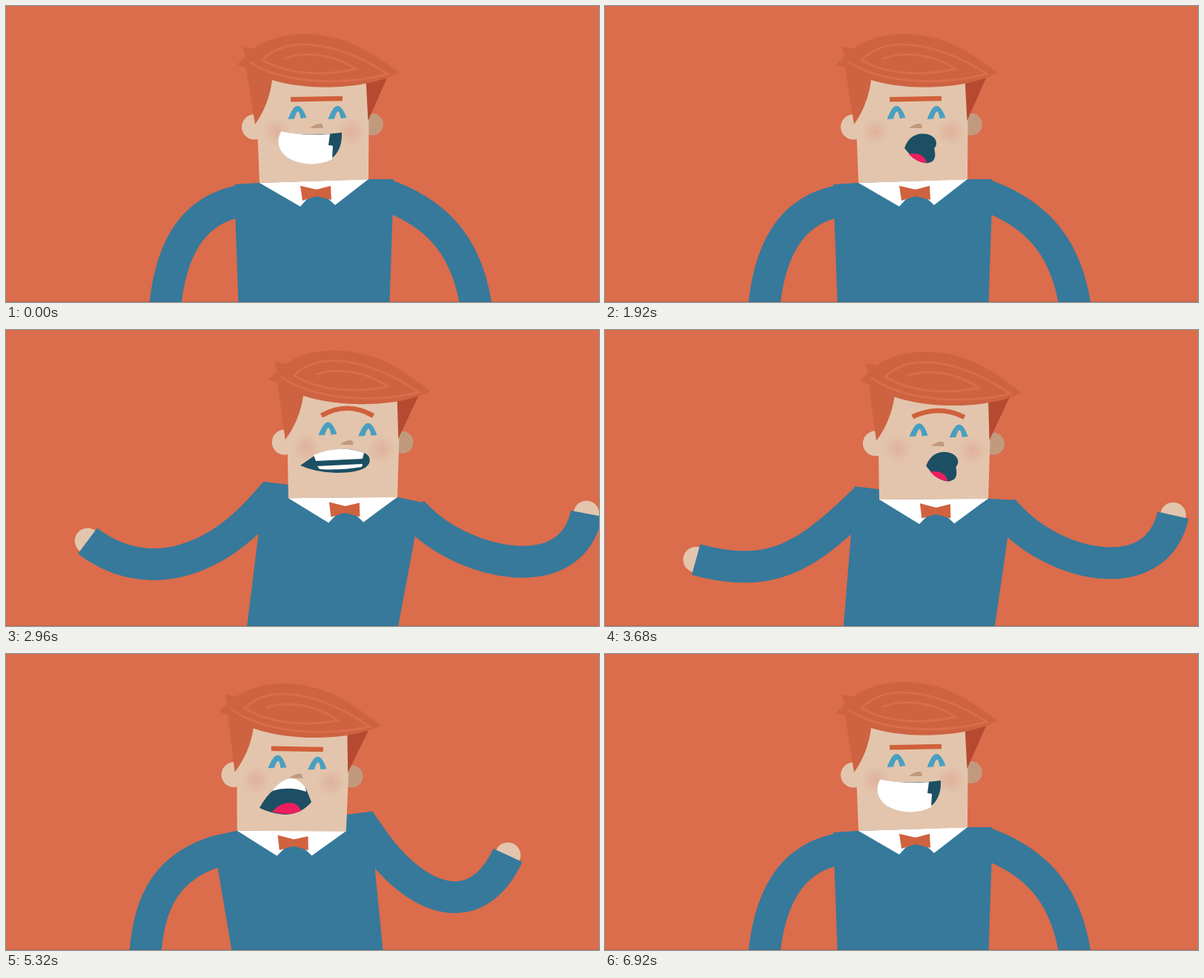
Animation, 800 px wide and 400 px high, one loop 7.04 s. Source, as an HTML page:

```html
<!DOCTYPE html>
<html lang="en">
<head>
<meta charset="utf-8">
<title>Talking man</title>
<style>
html, body { margin: 0; width: 100%; height: 100%; overflow: hidden; background: #db6c4c; }
svg { display: block; width: 100vw; height: 100vh; }
.hair { fill: #ce6341; }
.skin { fill: #e3c5ad; }
.shade { fill: #c19a7e; }
.blue { fill: #36799b; }
.arm { fill: none; stroke: #36799b; stroke-width: 43; }
.dark { fill: #1c4f63; }
.white { fill: #fff; }
.tongue { fill: #ec1e5f; }
.mouth { display: none; }
</style>
</head>
<body>
<svg viewBox="0 0 800 400">
  <defs>
    <radialGradient id="blush">
      <stop offset="0" stop-color="#dc9e8c" stop-opacity=".5"/>
      <stop offset="1" stop-color="#dc9e8c" stop-opacity="0"/>
    </radialGradient>
  </defs>

  <circle id="handL" class="skin" r="17.3"/>
  <circle id="handR" class="skin" r="17.3"/>
  <path id="armL" class="arm"/>
  <path id="armR" class="arm"/>
  <path id="torso" class="blue"/>

  <g id="head">
    <circle class="skin" cx="335" cy="163.5" r="17"/>
    <circle class="shade" cx="494" cy="160" r="15"/>
    <path class="white" d="M342 239L489 234L444 269L434 260Q419 253 406 261L397 271Z"/>
    <path fill="#d0623f" d="M397 243L419 248L438 243L439 262L419 257L400 263Z"/>
    <path class="skin" d="M336 90H485.5L489.5 158L489 234.5L342 239Z"/>
    <path fill="#b54a31" d="M485.5 98L515 95L488.5 155Z"/>
    <path class="hair" d="M319 55L334 58C365 34 430 28 485 60Q508 73 530 90C490 112 410 116 359 100Q355 133 336 160L324 84L312 79L323 68Z"/>
    <path fill="none" stroke="#db6c4c" stroke-width="3" d="M328 75C370 104 450 109 515 92C465 58 385 32 346 73C380 93 430 95 472 85C445 66 405 60 375 71"/>

    <circle cx="365" cy="170" r="20" fill="url(#blush)"/>
    <circle cx="466" cy="170" r="20" fill="url(#blush)"/>
    <path id="brow" fill="none" stroke="#d0603c" stroke-width="6.5"/>
    <g id="eyes" fill="#489fc0">
      <path id="eye" d="M380.5 153Q393 118 405.5 151L397.5 152Q394.5 133 389 152.5Z"/>
      <use href="#eye" x="54"/>
    </g>
    <path class="shade" d="M410 165Q418 158 426 159Q428 162 428 165Z"/>

    <!-- G grin, T teeth, O small round, S shout, A open, W wide -->
    <g id="G" class="mouth">
      <path class="dark" d="M371 170Q410 177 453 171C454 200 438 213 412 213C378 213 360 192 371 170Z"/>
      <path class="white" d="M371 169.5Q404 176 437 173L435 188L441 189L440 207Q428 213.5 412 213.5C378 213.5 359 192 371 169.5Z"/>
    </g>
    <g id="T" class="mouth">
      <path class="dark" d="M361 197Q375 188 385 185Q425 168 450 179L458 188Q415 200 361 197Z"/>
      <path class="white" d="M383 186Q425 166 448 179L449 184Q418 185 386 190Z"/>
      <path class="white" d="M389 191L444 187V191Q418 195 392 195Z"/>
    </g>
    <g id="O" class="mouth" transform="translate(-8 2.5) rotate(-.3 423.5 234)">
      <path class="dark" d="M434 186Q442 172 454 172C466 173 467 183 463 187C466 199 457 202 449 199Q440 195 434 186Z"/>
    </g>
    <g id="S" class="mouth" transform="translate(-39 10) rotate(-1.3 454.5 226.5)">
      <path class="dark" d="M397 183L416 170Q450 154 483 166Q493 170 490 180Q484 193 445 193Q416 192 397 183Z"/>
      <path class="white" d="M415 169Q450 154 483 166L481 174L418 177Z"/>
      <path class="white" d="M420 184L481 181L480 185Q450 190 423 188Z"/>
    </g>
    <g id="A" class="mouth" transform="translate(24.7 -.5) rotate(-2.1 390.8 237)">
      <path class="dark" d="M381 192Q388 174 405 173.5C424 174 428 188 421 194C424 208 420 213 409 213.5Q394 211 381 192Z"/>
      <path class="tongue" d="M386 200Q407 198 410 213.5Q396 212 386 200Z"/>
    </g>
    <g id="W" class="mouth" transform="translate(30.2 -2.5) rotate(-2.1 385.3 239)">
      <path class="dark" d="M342 208Q352 190 362 183Q385 158 404 180L412 200Q398 217 375 217Q356 215 342 208Z"/>
      <path class="white" d="M359 185Q384 154 404 180L405 186Q382 178 359 185Z"/>
      <path class="tongue" d="M359 213Q371 200 384 201Q395 202 398 212Q380 220 359 213Z"/>
    </g>
  </g>
  <rect y="399" width="800" height="1" opacity=".1"/>
</svg>

<script>
const LOOP = 7040, STEP = 40, SYLLABLE = 80;
const NECK_X = 415.5, NECK_Y = 236.5;
const $ = id => document.getElementById(id);
const mix = (a, b, k) => a.map((v, i) => v + (b[i] - v) * k);

// Pose: neck x, y, tilt, brow lift, then for the left and the right arm:
// shoulder height, shoulder angle, wrist angle, hand x, y.
const stand = [NECK_X, NECK_Y, 0, 0, 4.5, 14, -88, 213, 432, -2.5, 22, -86, 637, 432];
const lean = [423.5, 234, .3, 4, 0, 20, -76, 198, 432, -1, 24, -84, 665, 432];
const cheer = [454.5, 226.5, 1.3, 20, -21.5, 48, 37, 110, 285, 6.5, 45, 79, 783, 248];
const turn = [390.8, 237, 2.1, 3, 4, 20, -89, 184, 432, -23, 55, 68, 687, 261];
const wave = [385.3, 239, 2.1, 0, 7, 18, -90, 187, 432, -26, 55, 65, 677, 272];
const rest = mix(wave, stand, -.055);

const smooth = x => x * x * (3 - 2 * x);
const easeIn = x => x * x;
const easeOut = x => Math.sin(x * Math.PI / 2);
const swing = x => smooth(x * .85) / smooth(.85);
const cubic = x => x < .5 ? 4 * x ** 3 : 1 - 4 * (1 - x) ** 3;

const keys = [
  [0, stand], [2280, stand], [2480, lean, easeIn], [2960, cheer, easeOut],
  [3560, cheer], [3960, turn, swing], [4240, rest, easeOut],
  [5160, rest], [5840, stand, cubic], [LOOP, stand]
];

// One mouth per syllable; the last is held to the end, then he grins.
const phrases = [
  [200, 760, 'TOSATOA'], [920, 1200, 'AOTA'], [1440, 1680, 'TOA'],
  [1840, 3160, 'TASOTASTOAWTAOS'], [3560, 4240, 'TASOTAOT'],
  [4360, 4840, 'TASOTA'], [5160, 6440, 'TAWOASTOASOTAT'], [6440, 6920, 'SOTAS']
];
const blinks = [600, 960, 1520, 3320];

function poseAt(t) {
  const i = keys.findIndex(k => k[0] > t);
  const [t0, from] = keys[i - 1], [t1, to, ease = x => x] = keys[i];
  return mix(from, to, ease((t - t0) / (t1 - t0)));
}

function mouthAt(t) {
  const phrase = phrases.find(([start, end]) => t >= start && t < end);
  if (!phrase) return 'G';
  const [start, , word] = phrase;
  return word[Math.min(word.length - 1, Math.floor((t - start) / SYLLABLE))];
}

// Moves outward (side -1 or 1) and down from a point.
function polar(x, y, side, angle, length) {
  const a = angle * Math.PI / 180;
  return [x + side * length * Math.cos(a), y + length * Math.sin(a)];
}

function drawArm(name, side, [sx, sy], [ax, ay], [angle, wrist, hx, hy]) {
  const x = (sx + ax) / 2, y = (sy + ay) / 2;
  const [ux, uy] = polar(0, 0, side, angle, 1);
  // run back along the sleeve until its edge meets the shoulder corner
  const back = Math.max(0, (x - sx) * ux + (y - sy) * uy);
  const curve = [polar(x, y, side, angle, 45 + angle), polar(hx, hy, -side, wrist, 103), [hx, hy]];
  $('arm' + name).setAttribute('d', `M${x - back * ux} ${y - back * uy}L${x} ${y}C${curve}`);
  $('hand' + name).setAttribute('transform', `translate(${hx} ${hy})`);
}

function drawBody(pose) {
  const [x, y, tilt] = pose;
  const drop = 2.5 - 1.28 * tilt;
  const waist = NECK_X + .3 * (x - NECK_X);
  const spine = x + .3 * (waist - x);
  const outline = (name, side, [lift, ...arm]) => {
    const collarY = y - side * drop;
    const shoulder = [x + side * 107, y + lift];
    const armpit = [spine + side * 106, collarY + 50];
    drawArm(name, side, shoulder, armpit, arm);
    return [[x + side * 73.5, Math.min(collarY, y + lift + 4)], shoulder, armpit,
      [waist + side * 102, 400]];
  };
  const left = outline('L', -1, pose.slice(4, 9));
  const right = outline('R', 1, pose.slice(9));
  const collar = [[x - 73.5, y + drop], [x + 73.5, y - drop]];
  $('torso').setAttribute('d', `M${[...collar, ...right, ...left.reverse()]}Z`);
}

function draw(t) {
  const pose = poseAt(t);
  const [x, y, tilt, lift] = pose;
  drawBody(pose);
  $('head').setAttribute('transform',
    `translate(${x - NECK_X} ${y - NECK_Y}) rotate(${tilt} ${NECK_X} ${NECK_Y})`);
  $('brow').setAttribute('d', `M384 126.3Q419 ${125.6 - lift} 454 125`);

  const since = Math.min(...blinks.map(b => t < b ? LOOP : t - b));
  const open = since < 40 ? .5 : since < 80 ? .15 : 1;
  $('eyes').setAttribute('transform', `translate(0 ${144 * (1 - open)}) scale(1 ${open})`);

  const shown = mouthAt(t);
  for (const m of 'GTOSAW') $(m).style.display = m === shown ? 'inline' : 'none';
}

function tick() {
  draw(Math.floor(performance.now() % LOOP / STEP) * STEP);
  requestAnimationFrame(tick);
}
tick();
</script>
</body>
</html>
```
